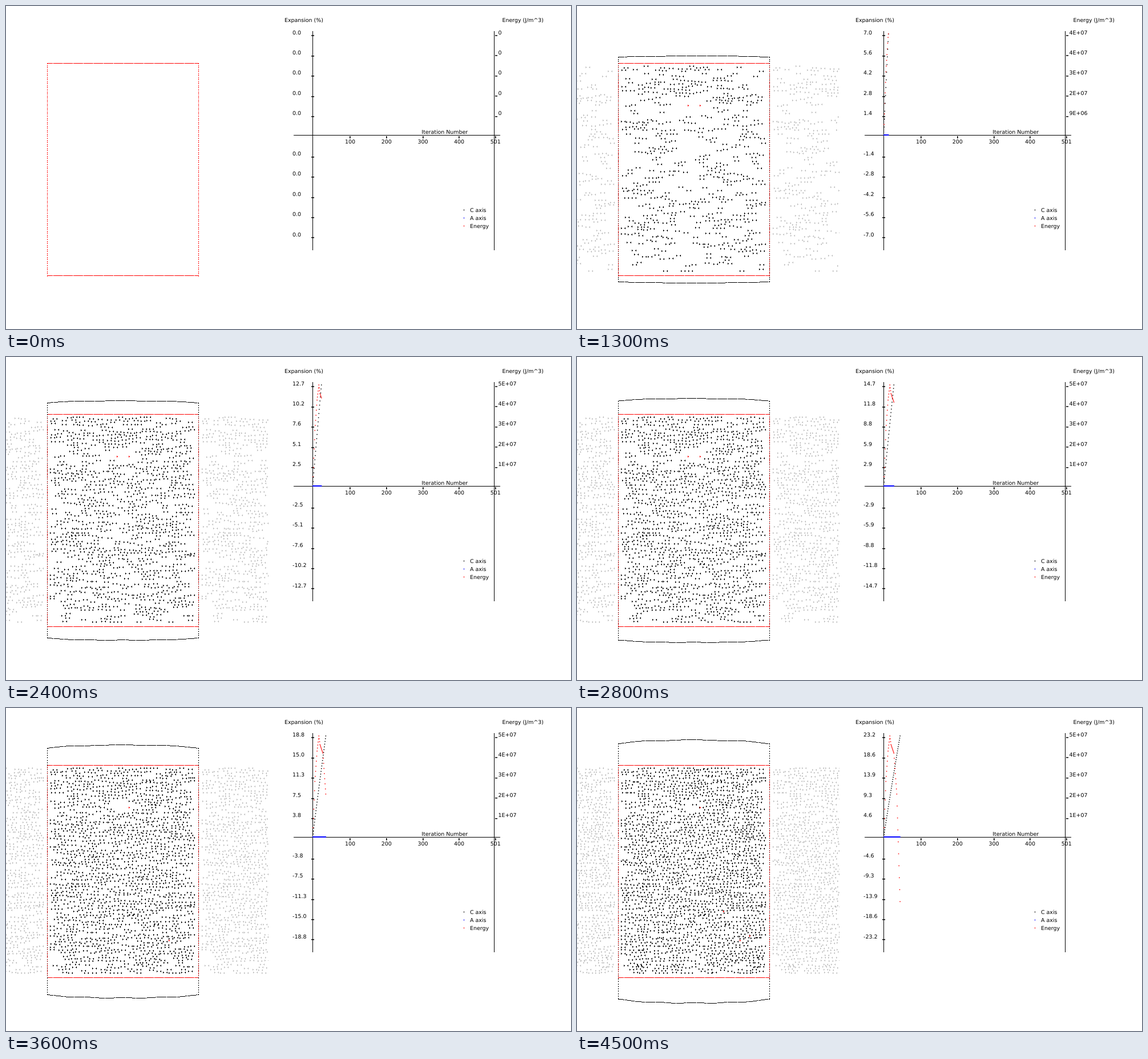
Animation of 990x566 px, one loop 4.6 s. Source, as an HTML page with a canvas:

```html
<!DOCTYPE html>
<html lang="en">
<head>
<meta charset="utf-8">
<title>Expansion simulation</title>
<style>
  html, body { margin: 0; width: 100%; height: 100%; overflow: hidden; background: #fff; }
  canvas, svg { position: absolute; left: 0; top: 0; width: 990px; height: 566px; }
  text { font: 9.44px "DejaVu Sans", Verdana, sans-serif; fill: #000; text-rendering: geometricPrecision; }
</style>
</head>
<body>
<canvas id="stage" width="990" height="566"></canvas>
<svg id="labels" viewBox="0 0 990 566"></svg>
<script>
const STEP = 100, STEPS = 46, LAST = STEPS - 1;
const ctx = document.getElementById('stage').getContext('2d');
const labels = document.getElementById('labels');

// Cell geometry
const LEFT = 72, RIGHT = 337, TOP = 100, BOTTOM = 472, PERIOD = 265.5;

// Chart geometry
const ORIGIN_X = 537.4, PER_ITER = 0.637, ZERO_Y = 226, HEIGHT = 177, TICK = 35.4;

// Key points: [iteration, expansion %] and [iteration, share of peak energy]
const EXPANSION = [[0, 0], [6, 3.3], [13, 7.02], [20, 10.7], [28, 14.73], [36, 18.8], [45, 23.22]];
const ENERGY = [[0, 0], [6, .55], [12, .85], [17, 1], [20, .915], [28, .83], [36, .425], [45, -.64]];
const PEAK = 5.05e7;

// Red marks: x, y, first and last step
const DEFECTS = [[194, 174, 9, 31], [215, 174, 9, LAST], [285, 407, 34, LAST],
  [256, 356, 40, LAST], [302, 399, 41, LAST]];

function lerpAt(points, x) {
  let i = 1;
  while (i < points.length - 1 && points[i][0] < x) i++;
  const [x0, y0] = points[i - 1], [x1, y1] = points[i];
  return y0 + (y1 - y0) * (x - x0) / (x1 - x0);
}

function randomFrom(seed) {
  return () => {
    seed = (seed + 0x6D2B79F5) | 0;
    let t = Math.imul(seed ^ (seed >>> 15), 1 | seed);
    t = (t + Math.imul(t ^ (t >>> 7), 61 | t)) ^ t;
    return ((t ^ (t >>> 14)) >>> 0) / 4294967296;
  };
}

const pairCount = n => Math.round(38 * n - 0.25 * n * n);

// Pairs appear at random or join an earlier pair sideways, which forms short rows.
function makePairs(total) {
  const rand = randomFrom(71), pairs = [];
  const clamp = (v, lo, hi) => Math.round(Math.min(hi, Math.max(lo, v)));
  const blocked = (x, y) =>
    Math.hypot(x + 4 - 205, y - 172) < 12 ||
    pairs.some(p => Math.abs(p.x - x) < 9 && Math.abs(p.y - y) < 4);
  while (pairs.length < total) {
    let x, y, tries = 0;
    do {
      if (pairs.length && rand() < 0.5) {
        const near = pairs[Math.floor(rand() * pairs.length)];
        x = near.x + (rand() < 0.5 ? -1 : 1) * (7 + rand() * 9);
        y = near.y + (rand() - 0.5) * 9;
      } else {
        x = 77 + rand() * 246;
        y = 105 + rand() * 360;
      }
      x = clamp(x, 77, 323);
      y = clamp(y, 105, 464);
    } while (blocked(x, y) && ++tries < 14);
    pairs.push({ x, y });
  }
  return pairs;
}
const PAIRS = makePairs(pairCount(LAST));

function rect(color, x, y, w, h) {
  ctx.fillStyle = color;
  ctx.fillRect(x, y, w, h);
}

function mark(color, x, y, facing) {
  rect(color, x, y - 1, 1, 3);
  rect(color, x + facing, y, 1, 1);
}

function drawPairs(n) {
  const visible = PAIRS.slice(0, pairCount(n));
  const layer = (shift, color) => {
    for (const { x, y } of visible) {
      const px = Math.round(x + shift);
      mark(color, px, y, 1);
      mark(color, px + 7, y, -1);
    }
  };
  ctx.save();
  ctx.beginPath();
  ctx.rect(0, 0, 460, 566);
  ctx.clip();
  layer(-PERIOD, '#c0c0c0');
  layer(PERIOD, '#c0c0c0');
  layer(0, '#000');
  ctx.restore();
  for (const [x, y, from, to] of DEFECTS)
    if (n >= from && n <= to) mark('#f00', x, y, 1);
}

// Bulge of an edge in px at the last step: a rounded dome with a slight ripple
function bulge(x, peakX, ripple) {
  const u = Math.abs(x - 204.5) / 132.5;
  return 38.2 + 6.2 * (1 - u ** 2.5) + 0.6 * Math.cos((x - peakX) / ripple);
}

function drawCell(n) {
  for (const y of [TOP, BOTTOM])
    for (let x = LEFT - 7; x < RIGHT; x += 17.7) {
      const start = Math.max(LEFT, x);
      rect('#f00', start, y, Math.min(RIGHT, x + 16.8) - start, 1);
    }
  for (const x of [LEFT, RIGHT])
    for (let y = TOP; y < BOTTOM; y += 3.54) rect('#f00', x, Math.round(y), 1, 2);
  if (!n) return;

  const grow = n / LAST;
  const top = x => Math.round(TOP - bulge(x, 200, 14.3) * grow);
  const bottom = x => Math.round(BOTTOM + bulge(x, 173, 10) * grow);
  for (let x = LEFT; x <= RIGHT; x++) {
    if ((x - LEFT) % 18 === 11) continue;
    rect('#000', x, top(x), 1, 1);
    rect('#000', x, bottom(x), 1, 1);
  }
  for (const x of [LEFT, RIGHT]) {
    const end = bottom(x), pitch = 3.54 * (1 + grow * 0.2);
    for (let y = top(x); y < end; y += pitch) {
      const inside = y > TOP && y < BOTTOM;
      rect('#000', x, Math.round(y), 1, inside ? 1 : 2);
    }
  }
}

function dot(color, x, y) {
  rect(color, x - 0.75, y - 0.75, 1.5, 1.5);
}

function drawAxes() {
  rect('#000', 537, 44, 1, 384);
  rect('#000', 855, 44, 1, 384);
  rect('#000', 504, 226, 362, 1);
  for (let k = -5; k <= 5; k++) {
    if (!k) continue;
    rect('#000', 535, Math.round(228.4 - k * TICK), 5, 1.5);
    if (k > 0) rect('#000', 857, Math.round(227.9 - k * TICK), 4, 1.5);
  }
  for (let k = 1; k <= 5; k++) rect('#000', Math.round(538.5 + k * 63.7), 228, 1.6, 4);
  ['#000', '#00f', '#f00'].forEach((color, i) => dot(color, 802.5, 357.5 + 14 * i));
}

function drawPlot(n) {
  const maxC = lerpAt(EXPANSION, n);
  const maxE = n > 17 ? 1 : lerpAt(ENERGY, n);
  const plot = (color, points, i, max) =>
    dot(color, ORIGIN_X + i * PER_ITER, ZERO_Y - HEIGHT * lerpAt(points, i) / max);
  for (let i = 1; i <= n; i++) {
    plot('#000', EXPANSION, i, maxC);
    plot('#f00', ENERGY, i, maxE);
  }
  if (n) rect('#00f', 537, 225, n * PER_ITER + 1, 2);
  for (const { k, node } of leftLabels) node.textContent = (maxC * k / 5).toFixed(1);
  for (const { k, node } of rightLabels) node.textContent = scientific(maxE * PEAK * k / 5);
}

function scientific(v) {
  if (!v) return '0';
  const [digit, power] = v.toExponential(0).split('e+');
  return digit + 'E+' + power.padStart(2, '0');
}

function addText(x, y, content) {
  const node = document.createElementNS('http://www.w3.org/2000/svg', 'text');
  node.setAttribute('x', x);
  node.setAttribute('y', y);
  node.textContent = content;
  labels.append(node);
  return node;
}

addText(488, 28.4, 'Expansion (%)');
addText(869.6, 28.4, 'Energy (J/m^3)');
addText(728.3, 223.5, 'Iteration Number');
['100', '200', '300', '400', '501'].forEach((s, i) => addText(594 + i * 63.7, 241, s));
['C axis', 'A axis', 'Energy'].forEach((s, i) => addText(813, 361 + i * 14, s));

const leftLabels = [], rightLabels = [];
for (let k = -5; k <= 5; k++) {
  if (!k) continue;
  const y = 226.6 - k * TICK;
  leftLabels.push({ k, node: addText(502, y, '') });
  if (k > 0) rightLabels.push({ k, node: addText(862.6, y, '') });
}

let shown = -1;
function frame() {
  const n = Math.floor(performance.now() / STEP) % STEPS;
  if (n !== shown) {
    shown = n;
    ctx.clearRect(0, 0, 990, 566);
    drawPairs(n);
    drawCell(n);
    drawAxes();
    drawPlot(n);
  }
  requestAnimationFrame(frame);
}
frame();
</script>
</body>
</html>
```
